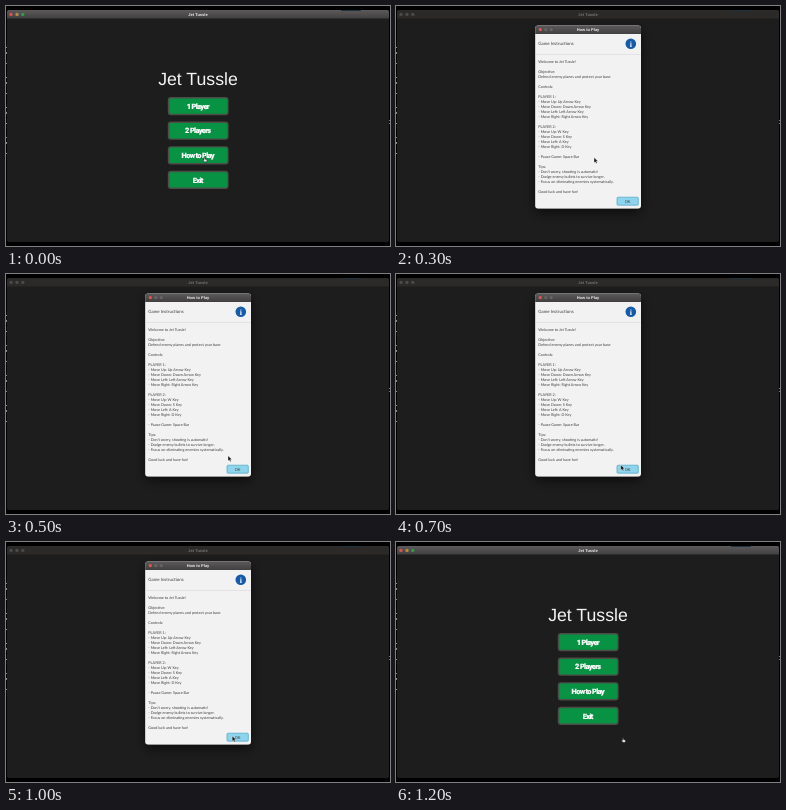
An HTML page that plays this animation: 384 by 240 pixels, repeating every 1300 ms.

```html
<!DOCTYPE html>
<html lang="en">
<head>
<meta charset="utf-8">
<title>Game menu</title>
<style>
  html, body { margin: 0; width: 100%; height: 100%; overflow: hidden; background: #000; }
  svg { display: block; width: 384px; height: 240px; }
  text { font-family: "Liberation Sans", Arial, sans-serif; text-rendering: geometricPrecision; }
  .mid { text-anchor: middle; }
  .bar { font-size: 4px; font-weight: bold; }
  .label { font: 900 7.4px Roboto, sans-serif; letter-spacing: -.65px; fill: #fff; stroke: #fff; stroke-width: .2; }
  .body { font: 3.75px Lato, sans-serif; fill: #3c3c3c; }
</style>
</head>
<body>
<svg viewBox="0 0 384 240">
  <defs>
    <filter id="shadow" x="-30%" y="-20%" width="160%" height="140%">
      <feDropShadow dx="0" dy="4" stdDeviation="6" flood-opacity=".6"/>
    </filter>
    <linearGradient id="metal" x2="0" y2="1">
      <stop stop-color="#5c5a5a"/>
      <stop offset="1" stop-color="#413f3f"/>
    </linearGradient>
  </defs>

  <!-- Desktop edges and main window -->
  <rect x="1" y="4" width="382" height="232" rx="2" fill="#1d1d1d"/>
  <path id="bar" d="M1 12.5V6q0-2 2-2h378q2 0 2 2v6.5z"/>
  <path d="M335 4.5h20" stroke="#1d3340"/>
  <path d="M.5 41v114" stroke="#888" stroke-dasharray="1 4 2 9 1 13"/>
  <path d="M383.5 114v4" stroke="#777" stroke-dasharray="1 2"/>
  <g id="lights"></g>
  <text id="title" class="bar mid" x="192" y="9.8">Jet Tussle</text>

  <g id="menu">
    <text class="mid" x="192" y="79" font-size="17.7" fill="#f4f4f4">Jet Tussle</text>
  </g>

  <g id="dialog">
    <rect x="139.2" y="19.5" width="105.8" height="183" rx="3" fill="#f2f2f2" filter="url(#shadow)"/>
    <path d="M139.2 28V22.5q0-3 3-3h99.8q3 0 3 3V28z" fill="url(#metal)"/>
    <circle cx="144.3" cy="23.6" r="1.6" fill="#e0574f"/>
    <circle cx="149.8" cy="23.6" r="1.6" fill="#686666"/>
    <circle cx="155.2" cy="23.6" r="1.6" fill="#686666"/>
    <text class="bar mid" x="192" y="25" fill="#eee">How to Play</text>
    <path d="M139.2 48.5H245" stroke="#d8d8d8" stroke-width=".6"/>
    <text class="body" x="142.3" y="39.4" style="font-size:4.4px">Game Instructions</text>
    <circle cx="234.8" cy="37.8" r="5.3" fill="#155ba8"/>
    <text class="mid" x="234.8" y="40.5" fill="#fff" style="font:bold 8px 'Liberation Serif',serif">i</text>
    <g id="lines"></g>
    <rect id="ok" x="221" y="191.2" width="21.3" height="8" rx="1" stroke="#4aa5c6" stroke-width=".7"/>
    <text class="body mid" x="231.6" y="196.7" style="font-size:4px">OK</text>
  </g>

  <path id="arrow" d="M0 0V5.2L1.3 4.2 2.2 6 3.2 5.5 2.3 3.7H4Z" fill="#111" stroke="#fff" stroke-width=".4"/>
  <path id="hand" d="M-1-2q.7-.7 1 0v1.4l1.7.5q.6.3.4 1.1L1.6 2.5H-.7L-2.1.5q0-.7 1.1-.1Z" fill="#e4e4e4" stroke="#111" stroke-width=".5"/>
</svg>
<script>
const $ = id => document.getElementById(id);
const LOOP = 1300, STEP = 100;

const lines = `Welcome to Jet Tussle!

Objective:
Defend enemy planes and protect your base

Controls:

PLAYER 1:
- Move Up: Up Arrow Key
- Move Down: Down Arrow Key
- Move Left: Left Arrow Key
- Move Right: Right Arrow Key

PLAYER 2:
- Move Up: W Key
- Move Down: S Key
- Move Left: A Key
- Move Right: D Key

- Pause Game: Space Bar

Tips:
- Don't worry, shooting is automatic!
- Dodge enemy bullets to survive longer.
- Focus on eliminating enemies systematically.

Good luck and have fun!`.split("\n");

$("lines").innerHTML = lines.map((line, i) =>
  `<text class="body" x="142.3" y="${57.2 + i * 4.98}">${line}</text>`).join("");

$("menu").innerHTML += ["1 Player", "2 Players", "How to Play", "Exit"].map((label, i) => {
  const y = 91 + i * 24.6;
  return `<rect x="161.8" y="${y}" width="60.8" height="18.2" rx="3.2" fill="#4b4f47"/>
    <rect x="163.3" y="${y + 1.4}" width="58" height="15.4" rx="2" fill="#079244"/>
    <text class="label mid" x="191.8" y="${y + 11.8}">${label}</text>`;
}).join("");

$("lights").innerHTML = [5, 11, 16.8].map(x => `<circle cx="${x}" cy="8.4" r="1.7"/>`).join("");

// Pointer path: time, x, y
const path = [
  [0, 199, 153.5], [100, 197, 151.3], [300, 198, 151.6], [400, 209, 167],
  [500, 222, 181.7], [600, 224.5, 190], [800, 225, 192],
  [1100, 226.8, 195], [1200, 227.5, 198]
];

function pointerAt(t) {
  const next = path.findIndex(p => p[0] > t);
  if (next < 0) return path.at(-1).slice(1);
  const [a, b] = [path[next - 1], path[next]];
  const k = (t - a[0]) / (b[0] - a[0]);
  return [1, 2].map(i => a[i] + (b[i] - a[i]) * k);
}

const show = (id, on) => $(id).style.display = on ? "" : "none";

function draw(t) {
  const open = t >= 100 && t < 1200;
  show("dialog", open);
  show("menu", !open);
  show("arrow", open);
  show("hand", !open);
  $("bar").setAttribute("fill", open ? "#2c2a29" : "url(#metal)");
  $("title").setAttribute("fill", open ? "#747474" : "#eee");
  [...$("lights").children].forEach((light, i) =>
    light.setAttribute("fill", open ? "#4b4b4b" : ["#d9544e", "#b98a45", "#2f9c46"][i]));
  $("ok").setAttribute("fill", t >= 1100 ? "#78c4df" : "#8ed4ed");
  $(open ? "arrow" : "hand").setAttribute("transform", `translate(${pointerAt(t)})`);
}

const start = performance.now();
function tick() {
  const t = (performance.now() - start) % LOOP;
  draw(Math.floor(t / STEP) * STEP);
  requestAnimationFrame(tick);
}
tick();
</script>
</body>
</html>
```
